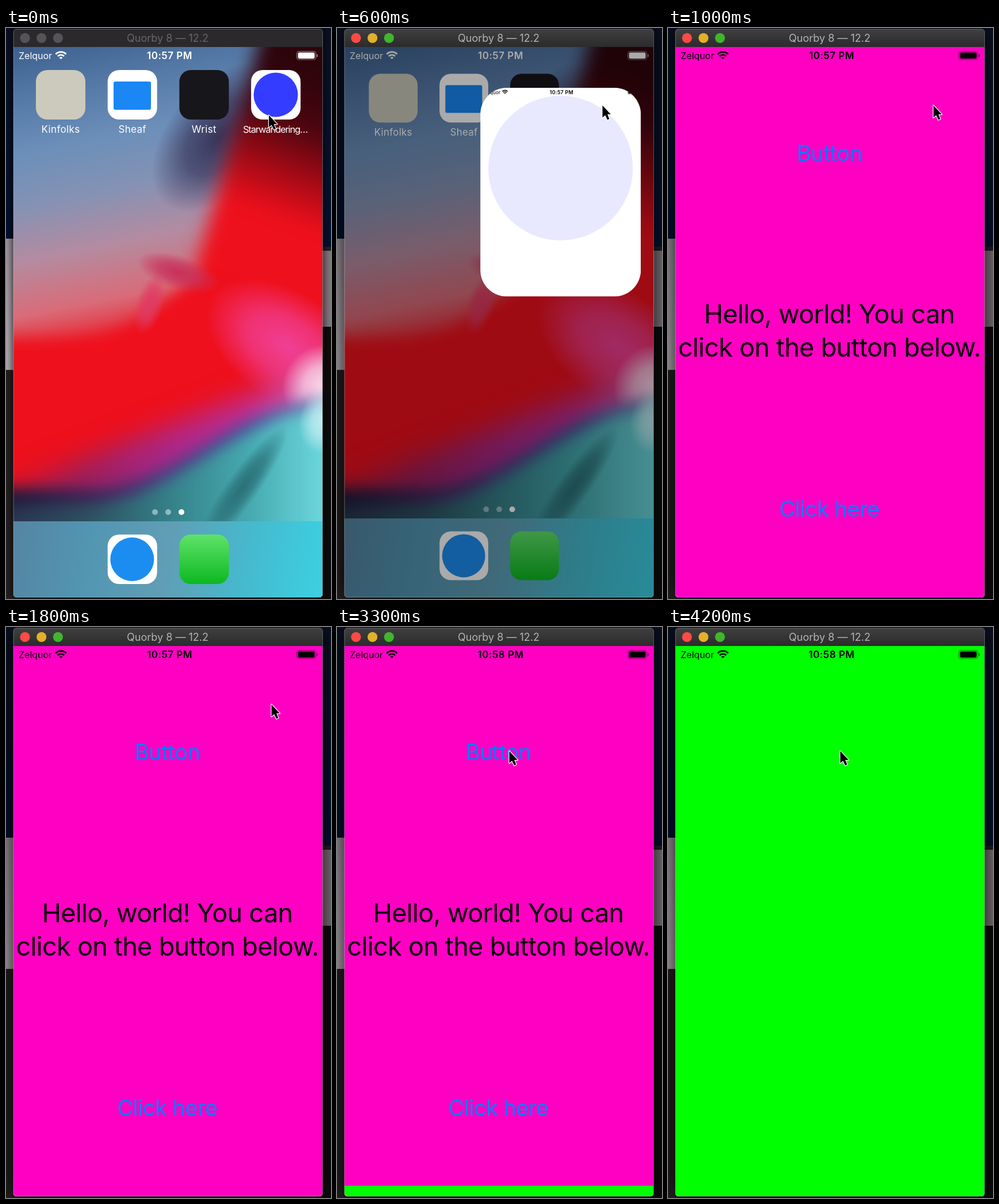
An HTML page with a canvas that plays this animation: 565 by 992 pixels, repeating every 4400 ms.

```html
<!DOCTYPE html>
<html lang="en">
<head>
<meta charset="utf-8">
<title>App launch</title>
<style>
html, body { margin: 0; width: 100%; height: 100%; overflow: hidden; background: #000; }
canvas { display: block; }
</style>
</head>
<body>
<canvas id="stage" width="565" height="992"></canvas>
<script>
const W = 565, H = 992, LOOP = 4400, STEP = 100;
const ICON = 86, PITCH = 124.7;
const win = { x: 13, y: 33, w: 537, h: 956 };
const midX = win.x + win.w / 2, midY = win.y + win.h / 2;
const PINK = '#ff00c3', LIME = '#00ff00', BLUE = '#007aff', LOGO = '#343dff';
let ctx = document.getElementById('stage').getContext('2d');

const clamp = v => Math.min(1, Math.max(0, v));
const mix = (a, b, p) => a + (b - a) * p;
const smooth = (a, b, v) => { const p = clamp((v - a) / (b - a)); return p * p * (3 - 2 * p); };
// Critically damped spring, from 0 to 1.
const spring = x => x <= 0 ? 0 : 1 - (1 + x) * Math.exp(-x);
const settle = (t, start, rate) => t >= start + 450 ? 1 : spring((t - start) * rate);
const columnX = i => 52 + i * PITCH;

function rect(x, y, w, h, fill, r = 0) {
  ctx.fillStyle = fill;
  ctx.beginPath();
  ctx.roundRect(x, y, w, h, r);
  ctx.fill();
}

function disc(x, y, r, fill) {
  ctx.fillStyle = fill;
  ctx.beginPath();
  ctx.arc(x, y, r, 0, 7);
  ctx.fill();
}

// Colours are spread evenly along the line.
function gradient(x0, y0, x1, y1, ...colors) {
  const g = ctx.createLinearGradient(x0, y0, x1, y1);
  colors.forEach((color, i) => g.addColorStop(i / (colors.length - 1), color));
  return g;
}

function text(str, x, y, size, color, { weight = 400, align = 'center', spacing = 0 } = {}) {
  ctx.font = `${weight} ${size}px Inter, sans-serif`;
  ctx.letterSpacing = spacing * size + 'px';
  ctx.textAlign = align;
  ctx.fillStyle = color;
  ctx.fillText(str, x, y);
}

// Everything below the curve y = edge(x), with a soft rim.
function layer(fill, blur, edge) {
  ctx.filter = `blur(${blur}px)`;
  ctx.fillStyle = fill;
  ctx.beginPath();
  ctx.moveTo(-60, H + 60);
  for (let x = -60; x <= W + 60; x += 10) ctx.lineTo(x, edge(x));
  ctx.lineTo(W + 60, H + 60);
  ctx.fill();
  ctx.filter = 'none';
}

function glow(x, y, rx, ry, angle, color) {
  ctx.save();
  ctx.translate(x, y);
  ctx.rotate(angle);
  ctx.scale(rx, ry);
  const g = ctx.createRadialGradient(0, 0, 0, 0, 0, 1);
  g.addColorStop(0, color);
  g.addColorStop(.5, color + 'b0');
  g.addColorStop(1, color + '00');
  disc(0, 0, 1, g);
  ctx.restore();
}

function paintWallpaper() {
  const fold = x => 800 - 155 * smooth(150, 550, x);
  rect(0, 0, W, H, gradient(0, 33, 110, 580,
    '#3c5f8d', '#5579a6', '#6b8fb9', '#8592b4', '#b48ba0', '#d96b78', '#ee101c'));
  glow(370, 190, 150, 90, -.9, '#38365c');
  layer(gradient(500, 70, 415, 310, '#2e040b', '#4a0510', '#a00a15', '#ee101c'), 16, x => 400 - 3.6 * (x - 335));
  layer('#ee101c', 14, x => 540 - 95 * Math.exp(-(((x - 340) / 110) ** 2)));
  glow(300, 425, 75, 30, .3, '#c8305a');
  glow(250, 480, 24, 55, .3, '#e03a64');
  glow(490, 555, 160, 95, .6, '#f04096');
  layer(gradient(0, 0, W, 0, '#c01838', '#98205f', '#a8288a', '#b8309c', '#e070b8'), 24, x => 800 - .38 * x);
  glow(555, 625, 75, 75, 0, '#fbdcec');
  layer(gradient(0, 0, W, 0, '#1c1838', '#3a2456', '#4c3f84', '#48539a', '#8088bc'), 13, fold);
  layer(gradient(0, 0, W, 0, '#2a3350', '#2c505e', '#358088', '#46aab0', '#6fdbe2'), 12, x => fold(x) + 30 - 12 * x / W);
  glow(410, 800, 130, 28, -.95, '#2b7078');
  glow(555, 680, 45, 60, .3, '#c4eef2');
}

const wallpaper = document.createElement('canvas');
wallpaper.width = W;
wallpaper.height = H;
const stageCtx = ctx;
ctx = wallpaper.getContext('2d');
paintWallpaper();
ctx = stageCtx;

function desktop(active) {
  rect(0, 0, W, H, '#241f20');
  rect(0, 0, W, 380, gradient(0, 0, 0, 380, '#0a1022', '#021030'));
  rect(0, 366, 20, 228, gradient(0, 366, 0, 594, '#a096a0', '#b8aeb6'));
  rect(540, 387, 25, 132, '#82787f');
  rect(540, 519, 25, H, '#0c0a0b');
  ctx.save();
  ctx.shadowColor = '#000';
  ctx.shadowBlur = active ? 40 : 16;
  rect(win.x, 2, win.w, 987, '#000', 5);
  ctx.restore();
}

function titleBar(active) {
  rect(13, 2, 537, 31, active ? gradient(0, 2, 0, 33, '#403f40', '#2c2b2c') : '#2b292b', [5, 5, 0, 0]);
  ['#fc4a45', '#e2b02a', '#3fb62c'].forEach((c, i) => disc(33 + i * 28.7, 17.3, 8.6, active ? c : '#555357'));
  text('Quorby 8 — 12.2', 281, 24, 18, active ? '#b5b3b5' : '#69676a');
}

function statusBar(color, clock) {
  text('Zelquor', 22, 54, 16, color, { align: 'left' });
  text(clock, 284.5, 54, 17, color, { weight: 600, spacing: .03 });
  ctx.strokeStyle = color;
  ctx.lineWidth = 2.8;
  for (const r of [2.6, 7.8, 12.8]) {
    ctx.beginPath();
    ctx.arc(95.5, 54.5, r, -Math.PI * .75, -Math.PI * .25);
    ctx.stroke();
  }
  ctx.save();
  ctx.globalAlpha *= .45;
  ctx.lineWidth = 1.2;
  ctx.beginPath();
  ctx.roundRect(505.6, 40.6, 33, 14.4, 4);
  ctx.stroke();
  rect(540, 45.5, 2, 5, color, 1);
  ctx.restore();
  rect(507.6, 42.4, 29, 10.8, color, 2.4);
}

const tile = (column, y, fill) => rect(columnX(column), y, ICON, ICON, fill, 20);

function homeScreen(scale, launching) {
  ctx.drawImage(wallpaper, 0, 0);
  statusBar('#fff', '10:57 PM');
  ctx.save();
  ctx.translate(midX, midY);
  ctx.scale(scale, scale);
  ctx.translate(-midX, -midY);
  rect(0, 857, W, 180, gradient(13, 870, 550, 960, '#5585a2', '#5296b2', '#609eb5', '#46b9cd', '#3ccfe2'));
  ['#cbcabd', '#fff', '#17161a'].forEach((fill, i) => tile(i, 73, fill));
  rect(187, 93, 65, 49, '#1a87f5', 3);
  if (!launching) {
    tile(3, 73, '#fff');
    disc(469, 116, 38.5, LOGO);
    text('Starwandering…', 468, 182, 16.5, '#fff', { spacing: -.07 });
  }
  ['Kinfolks', 'Sheaf', 'Wrist'].forEach((name, i) =>
    text(name, columnX(i) + ICON / 2, 182, 17, '#fff', { spacing: .02 }));
  [.45, .45, 1].forEach((a, i) => disc(259 + i * 23, 841, 5, `rgba(255,255,255,${a})`));
  tile(1, 880, '#fff');
  disc(219.3, 923, 38, '#1c8df0');
  tile(2, 880, gradient(0, 880, 0, 966, '#5fe36a', '#0cb820'));
  ctx.restore();
}

function appContent() {
  rect(win.x, win.y, win.w, win.h, PINK);
  const line = (str, y, size, color) => text(str, midX - 1, y, size, color, { spacing: -.015 });
  line('Button', 231, 38, BLUE);
  line('Hello, world! You can', 513, 45, '#000');
  line('click on the button below.', 571, 45, '#000');
  line('Click here', 849, 38, BLUE);
}

function appCard(t, p, clock) {
  const q = settle(t, 537, .0182);
  const w = mix(ICON, win.w, p), h = mix(ICON, win.h, q);
  const x = mix(469, midX, p) - w / 2, y = mix(116, midY, p) - h / 2;
  const scale = w / win.w;
  ctx.save();
  ctx.beginPath();
  ctx.roundRect(x, y, w, h, .29 * w * (1 - p));
  ctx.clip();
  rect(x, y, w, h, '#fff');
  ctx.globalAlpha = clamp(1 - p * 2.08);
  disc(x + w / 2, y + w / 2, w * .45, LOGO);
  ctx.translate(x, y);
  ctx.scale(scale, scale);
  ctx.translate(-win.x, -win.y);
  ctx.globalAlpha = clamp((t - 735) / 195);
  appContent();
  ctx.globalAlpha = 1;
  const sheet = settle(t, 3288, .0174);
  if (sheet) rect(win.x, mix(win.y + win.h, win.y, sheet), win.w, win.h, LIME);
  statusBar('#000', clock);
  ctx.restore();
}

const arrow = new Path2D('M0 0V21L4.8 17L8.6 25L12 23.5L8.6 15.6H14.4Z');

function cursor(x, y) {
  ctx.save();
  ctx.translate(x, y);
  ctx.lineJoin = 'round';
  ctx.lineWidth = 2.4;
  ctx.strokeStyle = '#fff';
  ctx.stroke(arrow);
  ctx.fillStyle = '#000';
  ctx.fill(arrow);
  ctx.restore();
}

function draw(t) {
  const p = settle(t, 522, .0187), active = t >= 200;
  desktop(active);
  ctx.save();
  ctx.beginPath();
  ctx.roundRect(win.x, win.y, win.w, win.h, [0, 0, 5, 5]);
  ctx.clip();
  if (p < 1) {
    homeScreen(1 - .08 * p * p, p > 0);
    rect(0, 0, W, H, `rgba(0,0,0,${.78 * p})`);
  }
  if (p) appCard(t, p, t < 2900 ? '10:57 PM' : '10:58 PM');
  ctx.restore();
  titleBar(active);
  ctx.strokeStyle = 'rgba(255,255,255,.33)';
  ctx.lineWidth = 1;
  ctx.beginPath();
  ctx.roundRect(13, 2, 537.5, 987, 5);
  ctx.stroke();
  const aim = smooth(0, 300, t), tap = smooth(2800, 3100, t);
  cursor(mix(mix(457, 461.5, aim), 299.5, tap), mix(mix(151.5, 134.5, aim), 215.5, tap));
}

// The picture advances in even steps of time.
function tick() {
  draw(Math.floor((performance.now() + 5) % LOOP / STEP) * STEP);
  requestAnimationFrame(tick);
}
tick();
</script>
</body>
</html>
```
